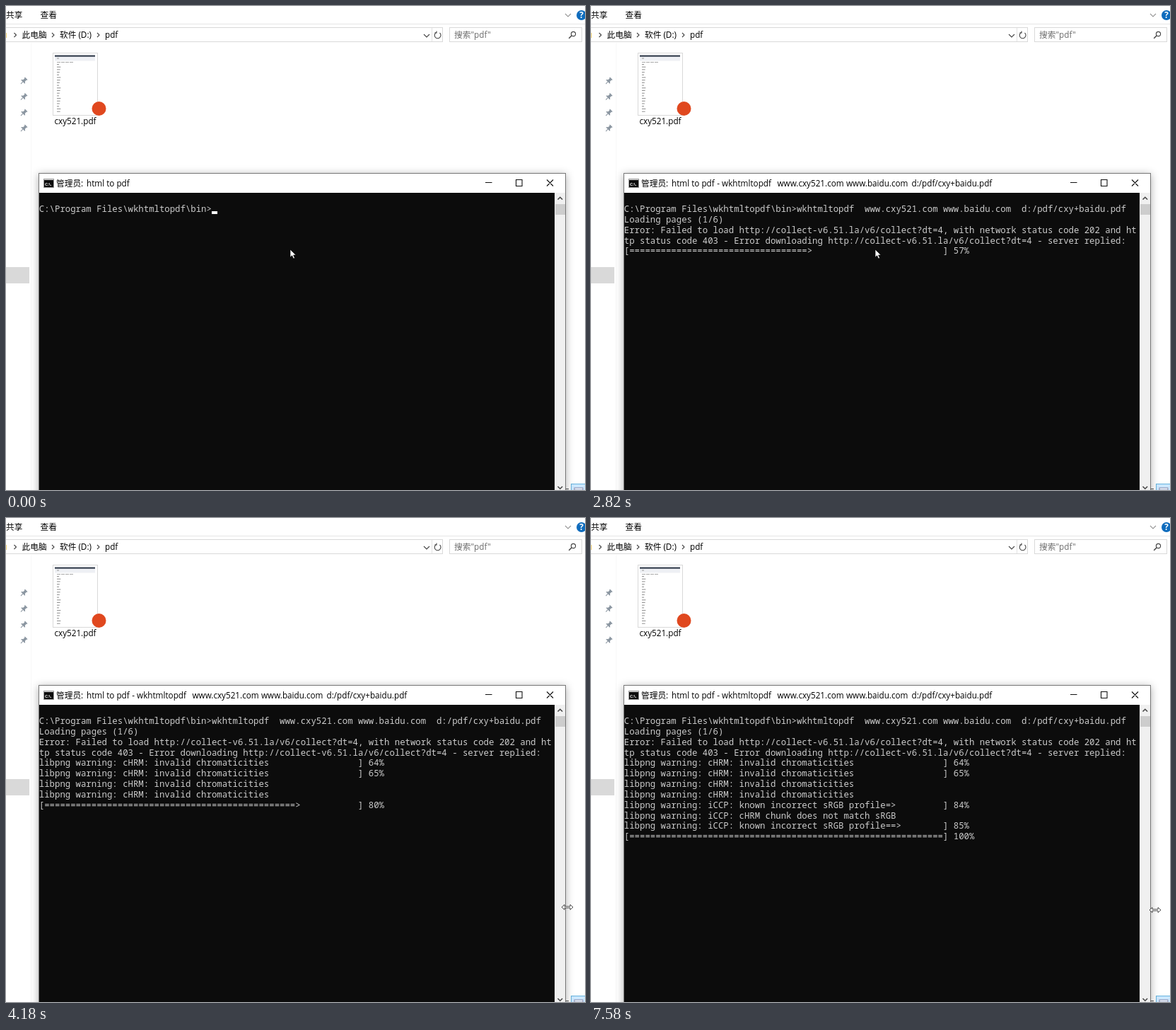
Recreate the animation shown at these times as an HTML page. Size 819 by 684 pixels, loop 8 s.

```html
<!DOCTYPE html>
<html lang="zh-CN">
<head>
<meta charset="utf-8">
<title>html to pdf</title>
<style>
  html, body { margin: 0; width: 100%; height: 100%; overflow: hidden; background: #fff; }
  svg { display: block; }
  text { white-space: pre; font: 11.7px "Open Sans", "Noto Sans", "Noto Sans CJK SC", "Noto Sans CJK", sans-serif; fill: #000; }
  .line { fill: none; stroke: #444; stroke-width: 1.1; }
  .box { fill: #fff; stroke: #d9d9d9; }
  #rows text { fill: #ccc; }
  .window { fill: #fff; stroke: #777; filter: drop-shadow(0 2px 6px rgba(0, 0, 0, .32)); }
</style>
</head>
<body>
<svg width="819" height="684" viewBox="0 0 819 684">
  <defs>
    <g id="pin" transform="rotate(45)" fill="#8b96a1">
      <path d="M-2.6-5.2h5.2v1.2h-.8v3.2l1.9 1.5v1h-7.4v-1l1.9-1.5v-3.2h-.8z"/>
      <path d="M-.5 1.7h1v4h-1z"/>
    </g>
    <path id="next" class="line" d="M-1.5-3l3 3-3 3"/>
    <path id="down" class="line" d="M-4-2l4 4 4-4"/>
  </defs>

  <!-- file manager -->
  <rect width="819" height="684" fill="#fff"/>
  <text x="0" y="17">共享</text>
  <text x="48.5" y="17">查看</text>
  <use href="#down" x="795" y="13" opacity=".55"/>
  <circle cx="814" cy="13" r="7" fill="#0f6cbd"/>
  <text x="811.2" y="17" style="fill:#fff;font-weight:700">?</text>
  <path d="M0 25.5h819" stroke="#e6e6e6"/>
  <path d="M35.5 52v632" stroke="#f8f8f8"/>

  <rect class="box" x="-2.5" y="30.5" width="620" height="20"/>
  <path d="M602.5 31v19" stroke="#e3e3e3"/>
  <rect y="38" width="1" height="7" fill="#f5d87a"/>
  <use href="#next" x="13" y="41"/>
  <text x="22.5" y="45">此电脑</text>
  <use href="#next" x="66.5" y="41"/>
  <text x="76" y="45">软件 (D:)</text>
  <use href="#next" x="130.5" y="41"/>
  <text x="140" y="45">pdf</text>
  <use href="#down" x="595" y="42"/>
  <path class="line" d="M613.5 38a4.4 4.4 0 1 1-4.6-.7M609 35.5v2.4h-2.5"/>
  <rect class="box" x="627.5" y="30.5" width="187" height="20"/>
  <text x="634" y="45" style="fill:#6d6d6d">搜索"pdf"</text>
  <circle class="line" cx="802.5" cy="39.5" r="3.1"/>
  <path class="line" d="M800.2 41.8l-4 4" style="stroke-width:1.5"/>

  <use href="#pin" transform="translate(25 106)"/>
  <use href="#pin" transform="translate(25 128.5)"/>
  <use href="#pin" transform="translate(25 151)"/>
  <use href="#pin" transform="translate(25 173)"/>
  <rect y="369" width="33" height="23" fill="#d9d9d9"/>

  <rect class="box" x="66.5" y="66.5" width="63" height="88"/>
  <rect x="69" y="69.5" width="57" height="2.2" fill="#333d4d"/>
  <rect x="69" y="72" width="57" height="5.5" fill="#eef0f4"/>
  <path d="M72 74h3" stroke="#999"/>
  <path d="M72 79.5h24" stroke="#aaa" stroke-dasharray="5 1"/>
  <g id="thumb" fill="#8d8d8d"></g>
  <circle cx="131.5" cy="145" r="10" fill="#e0481f"/>
  <text x="68.5" y="167">cxy521.pdf</text>

  <rect x="799.5" y="675.5" width="24" height="14" fill="#cce8ff" stroke="#66b3dd"/>
  <rect x="804" y="681" width="12" height="3" fill="#eef7ff" stroke="#88a"/>
  <path d="M792 682.5h4" stroke="#555"/>

  <!-- console window -->
  <rect class="window" x="46.5" y="236.5" width="745" height="460"/>
  <rect x="53.5" y="244.5" width="14" height="12" fill="#0c0c0c" stroke="#999"/>
  <path d="M54 245.5h13" stroke="#ddd"/>
  <text x="55" y="254" style="fill:#fff;font-size:6px;font-weight:700">C:\.</text>
  <text x="71" y="254.5">管理员:</text>
  <text x="114" y="254.5">html to pdf</text>
  <g id="running">
    <text x="178.3" y="254.5">- wkhtmltopdf</text>
    <text x="263.5" y="254.5">www.cxy521.com</text>
    <text x="361" y="254.5">www.baidu.com</text>
    <text x="453.5" y="254.5">d:/pdf/cxy+baidu.pdf</text>
  </g>
  <path class="line" d="M678 249.5h9.5M721.5 245.5h8.5v9h-8.5zM765 245.5l9 9M774 245.5l-9 9" style="stroke:#111"/>
  <rect x="47" y="264" width="729" height="420" fill="#0c0c0c"/>
  <rect x="776" y="264" width="15" height="420" fill="#f0f0f0"/>
  <rect x="777" y="280" width="14" height="15" fill="#cdcdcd"/>
  <path class="line" d="M780.5 273.5l3.3-3.3 3.3 3.3M780.5 679l3.3 3.3 3.3-3.3" style="stroke-width:1.5"/>
  <g id="rows"></g>
  <rect id="caret" width="8" height="4" fill="#fff"/>

  <!-- pointers -->
  <path id="arrow" d="M0 0v11.2l2.6-2.4 1.9 4.3 2-.9-1.9-4.1h3.6z" fill="#fff" stroke="#000" stroke-width=".7"/>
  <path id="resize" d="M-8 0l4-3.6v2.6h8v-2.6l4 3.6-4 3.6v-2.6h-8v2.6z" fill="#fff" stroke="#222" stroke-width=".8"/>
</svg>

<script>
const LOOP = 8000, CELL = 7.4, PITCH = 14.82, LEFT = 46.8, BASE = 291.2;
const $ = id => document.getElementById(id);
const MONO = '"Noto Sans Mono", "DejaVu Sans Mono", "Liberation Mono", monospace';

const PROMPT = 'C:\\Program Files\\wkhtmltopdf\\bin>';
const COMMAND = 'wkhtmltopdf  www.cxy521.com www.baidu.com  d:/pdf/cxy+baidu.pdf';
const URL_TEXT = 'http://collect-v6.51.la/v6/collect?dt=4';
const CHROMA = 'libpng warning: cHRM: invalid chromaticities';
const PROFILE = 'libpng warning: iCCP: known incorrect sRGB profile';
const CHUNK = 'libpng warning: iCCP: cHRM chunk does not match sRGB';

// Console actions: each changes the screen state in place.
const put = (row, text) => s => {
  s.rows[row] = text + (s.rows[row] || '').slice(text.length);
};
const bar = (row, percent) => s => {
  const n = Math.floor(percent * 0.6);
  const body = ('='.repeat(n) + '>').slice(0, 60).padEnd(60);
  s.rows[row] = `[${body}] ${percent}%`;
};
const caret = (col, row) => s => { s.caret = col === undefined ? null : [col, row]; };
const arrow = (x, y) => s => { s.pointer = ['arrow', x, y]; };
const resize = (x, y) => s => { s.pointer = ['resize', x, y]; };

const STEPS = [
  [0, put(0, PROMPT), caret(33, 0), arrow(402, 344)],
  [470, put(0, PROMPT + COMMAND), caret()],
  [530, caret(96, 0)],
  [1060, caret()],
  [1520, s => { s.running = true; }, caret(0, 1)],
  [1590, caret(), put(1, 'Loading pages (1/6)')],
  [1660, bar(2, 0)],
  [1730, bar(2, 10)],
  [2000, bar(2, 14)],
  [2060, bar(2, 21)],
  [2130, bar(2, 29)],
  [2400, bar(2, 35)],
  [2530, bar(2, 42)],
  [2600, bar(2, 49)],
  [2740, put(2, `Error: Failed to load ${URL_TEXT}, with network status code 202 and ht`),
         put(3, `tp status code 403 - Error downloading ${URL_TEXT} - server replied:`)],
  [2810, bar(4, 57)],
  [2880, bar(4, 64)],
  [2950, put(4, CHROMA), bar(5, 65)],
  [3020, put(5, CHROMA)],
  [3090, put(6, CHROMA)],
  [3150, put(7, CHROMA)],
  [3220, bar(8, 67)],
  [3280, bar(8, 68)],
  [3350, bar(8, 70)],
  [3410, bar(8, 71), arrow(415, 360)],
  [3480, bar(8, 72), arrow(455, 405)],
  [3540, bar(8, 73), arrow(520, 456)],
  [3610, bar(8, 74), arrow(620, 488)],
  [3670, bar(8, 75), arrow(695, 512)],
  [3740, bar(8, 76), arrow(750, 532)],
  [3810, bar(8, 77), resize(796, 546)],
  [3910, bar(8, 78), resize(795, 549)],
  [3980, bar(8, 79), resize(794, 550)],
  [4180, bar(8, 80)],
  [4500, bar(8, 81), resize(796, 552)],
  [4630, resize(798, 554)],
  [4760, bar(8, 82)],
  [4960, bar(8, 83)],
  [5290, bar(8, 84)],
  [5560, put(8, PROFILE)],
  [5640, put(9, CHUNK)],
  [5730, bar(10, 85)],
  [5820, put(10, PROFILE)],
  [5900, bar(11, 86)],
  [6500, bar(11, 87)],
  [6700, bar(11, 88)],
  [6900, bar(11, 89)],
  [7450, bar(11, 92)],
  [7520, bar(11, 96)],
  [7580, bar(11, 100)],
];

function addSvg(parent, tag, attrs) {
  const el = document.createElementNS('http://www.w3.org/2000/svg', tag);
  for (const key in attrs) el.setAttribute(key, attrs[key]);
  return parent.appendChild(el);
}

// Choose the type size whose natural advance fills one console cell.
const pen = document.createElement('canvas').getContext('2d');
pen.font = `100px ${MONO}`;
const size = CELL * 100 / pen.measureText('0').width;

const rowEls = Array.from({ length: 12 }, (_, i) => {
  const el = addSvg($('rows'), 'text', { x: LEFT, y: BASE + i * PITCH });
  el.style.font = `${size}px ${MONO}`;
  el.style.fontVariantLigatures = 'none';
  return el;
});

for (let i = 0; i < 19; i++) {
  addSvg($('thumb'), 'rect', { x: 72, y: 82 + i * 3.7, width: 3 + (i * 7 % 4) * 0.8, height: 1 });
}

function stateAt(index) {
  const state = { rows: [], caret: null, pointer: null, running: false };
  for (const [, ...actions] of STEPS.slice(0, index + 1)) actions.forEach(act => act(state));
  return state;
}

const show = (el, on) => { el.style.display = on ? '' : 'none'; };

function render(state) {
  rowEls.forEach((el, i) => { el.textContent = state.rows[i] || ''; });
  show($('running'), state.running);
  show($('caret'), state.caret);
  if (state.caret) {
    const [col, row] = state.caret;
    $('caret').setAttribute('x', LEFT + col * CELL);
    $('caret').setAttribute('y', 290 + row * PITCH);
  }
  const [kind, x, y] = state.pointer;
  for (const id of ['arrow', 'resize']) show($(id), id === kind);
  $(kind).setAttribute('transform', `translate(${x} ${y})`);
}

let shown = -1;
const start = performance.now();
function tick() {
  const time = (performance.now() - start) % LOOP;
  const index = STEPS.findLastIndex(([at]) => at <= time);
  if (index !== shown) render(stateAt(shown = index));
  requestAnimationFrame(tick);
}
tick();
</script>
</body>
</html>
```
